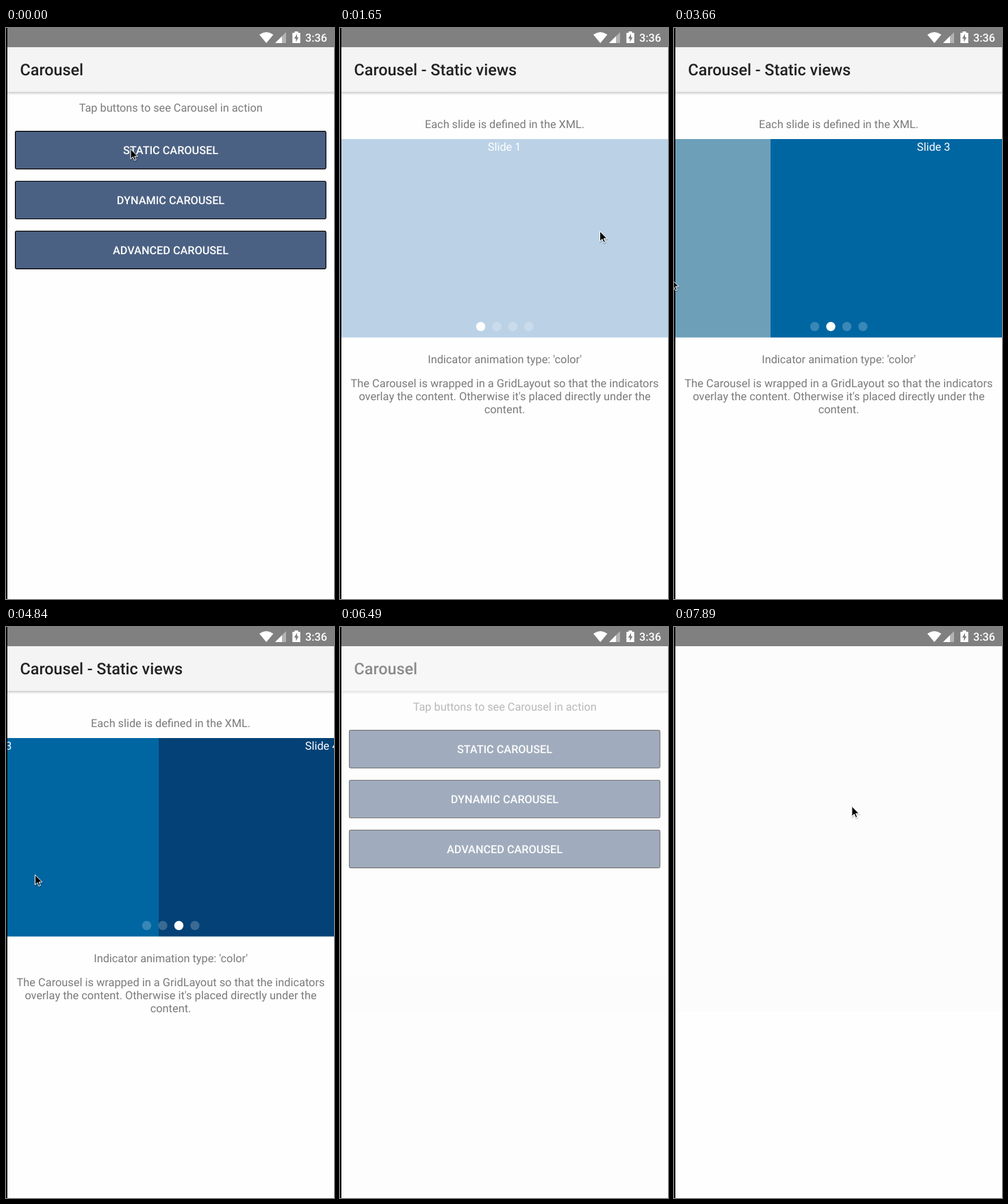
These frames come from a looping animation (479x833 px, 8 s). An HTML page:

```html
<!DOCTYPE html>
<html lang="en">
<head>
<meta charset="utf-8">
<title>Carousel demo</title>
<style>
  html, body { margin: 0; width: 100%; height: 100%; overflow: hidden; background: #fefefe; }
  svg { display: block; width: 100%; height: 100%; }
  text { font: 400 16.25px Roboto, sans-serif; fill: #7a7a7a; text-rendering: geometricPrecision; }
  .mid { text-anchor: middle; }
  .title { font-size: 23.35px; font-weight: 500; fill: #212121; }
  .label { font-weight: 500; fill: #fff; }
  .light { fill: #fff; }
  .note { font-size: 16.38px; }
</style>
</head>
<body>
<svg viewBox="0 0 479 833">
  <defs>
    <linearGradient id="shade" x2="0" y2="1">
      <stop offset="0" stop-color="#000" stop-opacity=".24"/>
      <stop offset=".4" stop-color="#000" stop-opacity=".1"/>
      <stop offset="1" stop-color="#000" stop-opacity="0"/>
    </linearGradient>
    <clipPath id="window"><rect x="2" y="162" width="477" height="289.5"/></clipPath>
    <g id="bar">
      <rect x="2" y="28" width="477" height="65.5" fill="#f4f4f4"/>
      <rect x="2" y="93.5" width="477" height="4.5" fill="url(#shade)"/>
    </g>
  </defs>

  <rect width="479" height="833" fill="#fefefe"/>
  <rect y="28" width="479" height="534" fill="#fcfcfc"/>

  <g id="home">
    <rect x="2" y="28" width="477" height="805" fill="#fefefe"/>
    <use href="#bar"/>
    <text class="title" x="20.5" y="69.4">Carousel</text>
    <text class="mid" x="240.7" y="122">Tap buttons to see Carousel in action</text>
    <g id="buttons"></g>
  </g>

  <g id="static">
    <rect x="2" y="28" width="477" height="805" fill="#fefefe"/>
    <use href="#bar"/>
    <text class="title" x="20.5" y="69.4">Carousel - Static views</text>
    <text class="mid" x="240.5" y="145.5">Each slide is defined in the XML.</text>
    <g clip-path="url(#window)"><g id="slides"></g></g>
    <g id="dots"></g>
    <text class="mid" x="240.7" y="489.4">Indicator animation type: 'color'</text>
    <text class="mid note" x="240.5" y="523.5">The Carousel is wrapped in a GridLayout so that the indicators</text>
    <text class="mid note" x="240.5" y="542.5">overlay the content. Otherwise it's placed directly under the</text>
    <text class="mid note" x="240.5" y="561.5">content.</text>
  </g>

  <rect width="479" height="28" fill="#808080"/>
  <g fill="#fff">
    <path d="M370 9.7Q380.2 2.3 390.4 9.7L380.2 22Z"/>
    <path d="M409 6V22H393Z" opacity=".4"/>
    <path d="M403 12V22H393Z"/>
    <path d="M421.5 5h5v2h3.2v15h-11.4v-15h3.2Z"/>
    <path d="M425 8.5L420.8 15.4H423.4V20.5L427.4 13.4H425Z" fill="#808080"/>
  </g>
  <text class="label" x="437" y="20.2">3:36</text>
  <rect width="2" height="833" fill="#000"/>

  <g id="cursor">
    <path d="M0 0V14.6L3.4 11.4 5.6 16.6 7.9 15.6 5.7 10.6H10.3Z" transform="translate(.6 1.6)" fill="#000" stroke="#000" stroke-width="2" opacity=".13"/>
    <path d="M0 0V14.6L3.4 11.4 5.6 16.6 7.9 15.6 5.7 10.6H10.3Z" fill="#000" stroke="#fff" stroke-width="1"/>
  </g>
</svg>

<script>
const LOOP = 8000, STEP = 117.8, PAGE = 477, IDLE = 0.22;
const SWIPES = [1897, 3273, 4521], DRAG = 589, RELEASE = 377, RECOLOR = 165;

// Resting and turning points of the pointer: time, x, y.
const POINTER = [
  [470, 182, 176.5], [1180, 374, 296], [1650, 379.5, 296.5], [1890, 379.5, 296.5],
  [2360, 51, 326.5], [3270, 350, 352], [3660, -4, 366.5], [4400, 315, 353],
  [4840, 42, 361.5], [5560, 466, 590], [6940, 432, 492], [7430, 259.8, 261.5]];

const $ = id => document.getElementById(id);
const ramp = (t, start, length) => Math.min(1, Math.max(0, (t - start) / length));
const smooth = u => u * u * (3 - 2 * u);
const total = (list, fn) => list.reduce((sum, item) => sum + fn(item), 0);

function add(parent, tag, attrs, label) {
  const el = document.createElementNS('http://www.w3.org/2000/svg', tag);
  for (const key in attrs) el.setAttribute(key, attrs[key]);
  if (label) el.textContent = label;
  return parent.appendChild(el);
}

['STATIC', 'DYNAMIC', 'ADVANCED'].forEach((word, i) => {
  const y = 150.6 + 72.9 * i;
  add($('buttons'), 'rect', { x: 13.6, y, width: 453.6, height: 55, rx: 1.8,
    fill: '#4b6183', stroke: '#000', 'stroke-width': 1.2 });
  add($('buttons'), 'text', { class: 'mid label', x: 240.5, y: y + 33.6 }, word + ' CAROUSEL');
});

['#bbd2e6', '#6d9fb9', '#0066a2', '#034176'].forEach((fill, i) => {
  const x = 2 + PAGE * i;
  add($('slides'), 'rect', { x, y: 162, width: PAGE, height: 290, fill });
  add($('slides'), 'text', { class: 'mid light', x: x + PAGE / 2 - 0.4, y: 179.4 }, 'Slide ' + (i + 1));
});

const dots = [0, 1, 2, 3].map(i =>
  add($('dots'), 'circle', { cx: 205.5 + 23.45 * i, cy: 435.5, r: 6.7, fill: '#fff' }));

function pointerAt(t) {
  let pos = POINTER[0].slice(1);
  POINTER.slice(1).forEach(([end, x, y], i) => {
    const begin = POINTER[i][0], k = smooth(ramp(t, begin, end - begin));
    pos = [pos[0] + (x - pos[0]) * k, pos[1] + (y - pos[1]) * k];
  });
  return pos;
}

function draw(time) {
  const t = Math.floor((time % LOOP + 6) / STEP) * STEP;

  $('home').setAttribute('opacity', 1 - ramp(t, 130, 300) + ramp(t, 6320, 310) - ramp(t, 7550, 300));
  $('static').setAttribute('opacity', t < 6450 ? ramp(t, 570, 300) : 0);

  const scroll = total(SWIPES, start => smooth(ramp(t, start, DRAG)));
  $('slides').setAttribute('transform', `translate(${-Math.round(PAGE * scroll)} 0)`);

  const active = total(SWIPES, start => ramp(t, start + RELEASE, RECOLOR));
  dots.forEach((dot, i) => {
    const weight = Math.max(0, 1 - Math.abs(active - i));
    dot.setAttribute('opacity', IDLE + (1 - IDLE) * weight);
  });

  const [x, y] = pointerAt(t);
  $('cursor').setAttribute('transform', `translate(${x} ${y})`);
  $('cursor').setAttribute('opacity', t > 5650 && t < 6940 ? 0 : 1);
}

const start = performance.now();
(function tick() {
  draw(performance.now() - start);
  requestAnimationFrame(tick);
})();
</script>
</body>
</html>
```
